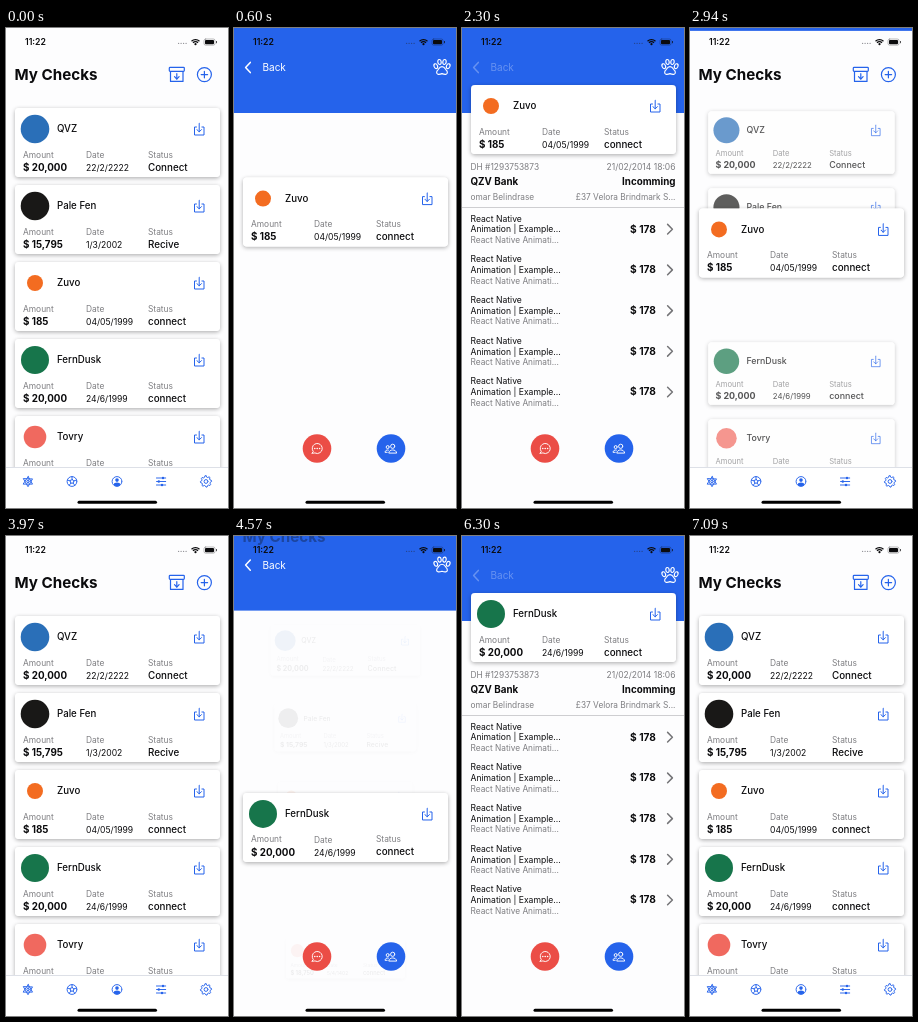
An HTML page with a canvas that plays this animation: 222x480 px, repeating every 7510 ms.

```html
<!DOCTYPE html>
<html lang="en">
<head>
<meta charset="utf-8">
<title>My Checks</title>
<style>
html, body { margin: 0; width: 100%; height: 100%; overflow: hidden; background: #fff; }
canvas { display: block; width: 222px; height: 480px; }
</style>
</head>
<body>
<canvas id="stage"></canvas>
<script>
const W = 222, H = 480, LOOP = 7510;
const BLUE = '#2563eb', INK = '#0b0b0d', GREY = '#7d7d80', PAGE = '#fdfdfe';
const FONT = 'Inter, Roboto, sans-serif';
const HEADER = 85, CARD_TOP = 57;

const canvas = document.getElementById('stage');
const ctx = canvas.getContext('2d');
const ratio = window.devicePixelRatio || 1;
canvas.width = W * ratio;
canvas.height = H * ratio;

const checks = [
  { name: 'QVZ', amount: '$ 20,000', date: '22/2/2222', status: 'Connect', color: '#2a6fb8', r: 14.3 },
  { name: 'Pale Fen', amount: '$ 15,795', date: '1/3/2002', status: 'Recive', color: '#191817', r: 14.3 },
  { name: 'Zuvo', amount: '$ 185', date: '04/05/1999', status: 'connect', color: '#f36c21', r: 8 },
  { name: 'FernDusk', amount: '$ 20,000', date: '24/6/1999', status: 'connect', color: '#17754b', r: 14 },
  { name: 'Tovry', amount: '$ 18,750', date: '5/4/1402', status: 'connect', color: '#f0695f', r: 11.3 }
];
const visits = [
  { card: 2, open: 330, press: 2300, release: 2390, close: 2550 },
  { card: 3, open: 4390, press: 6300, release: 6450, close: 6450 }
];

const slotTop = i => 80 + 77 * i;
const mix = (a, b, p) => a + (b - a) * p;
const ramp = (t, start, length) => Math.min(1, Math.max(0, (t - start) / length));
const ease = x => x < .5 ? 2 * x * x : 1 - 2 * (1 - x) * (1 - x);
const move = (t, start, length) => ease(ramp(t, start, length));

// Everything on screen at time t; 0 = list, 1 = detail.
function stateAt(t) {
  const visit = visits.find(v => t >= v.open && t < v.close + 640);
  if (!visit) return { card: -1, travel: 0, list: 0, header: 0, chrome: 0, buttons: 0, info: 0, rows: [], back: 1 };
  const { card, open, press, release, close } = visit;
  const dim = t >= press ? mix(.3, 1, ramp(t, release + 60, 200)) : 1;
  if (t < close) {
    const s = t - open;
    const list = move(s, 0, 222);
    return {
      card, list, chrome: list, back: dim, opening: true,
      travel: move(s, 0, 555),
      header: move(s, 0, 240),
      buttons: move(s, 0, 160),
      info: move(s, 360, 220),
      rows: [0, 1, 2, 3, 4].map(i => move(s, 390 + 60 * i, 150))
    };
  }
  const s = t - close;
  const travel = 1 - move(s, 0, 640);
  const fade = 1 - move(s, 0, 240);
  return {
    card, travel, list: travel, back: dim,
    header: 1 - move(s, 0, 460),
    chrome: 1 - move(s, 0, 380),
    buttons: fade, info: fade, rows: Array(5).fill(fade)
  };
}

function text(str, x, y, size, color = INK, weight = 400, align = 'left') {
  ctx.font = `${weight} ${size}px ${FONT}`;
  ctx.textAlign = align;
  ctx.fillStyle = color;
  ctx.fillText(str, x, y);
}
function disc(x, y, r, color) {
  ctx.fillStyle = color;
  ctx.beginPath();
  ctx.arc(x, y, r, 0, 7);
  ctx.fill();
}
function ring(x, y, r) {
  ctx.beginPath();
  ctx.arc(x, y, r, 0, 7);
  ctx.stroke();
}
function box(x, y, w, h, r) {
  ctx.beginPath();
  ctx.roundRect(x, y, w, h, r);
}
function line(...p) {
  ctx.beginPath();
  for (let i = 0; i < p.length; i += 2) ctx.lineTo(p[i], p[i + 1]);
  ctx.stroke();
}
function pen(color, width) {
  ctx.strokeStyle = color;
  ctx.lineWidth = width;
  ctx.lineCap = ctx.lineJoin = 'round';
}
function layer(alpha, draw) {
  if (alpha <= 0) return;
  ctx.save();
  ctx.globalAlpha *= alpha;
  draw();
  ctx.restore();
}
function polar(x, y, count, radius) {
  ctx.beginPath();
  for (let i = 0; i < count; i++) {
    const a = i * 2 * Math.PI / count - Math.PI / 2, r = radius(i);
    ctx.lineTo(x + r * Math.cos(a), y + r * Math.sin(a));
  }
  ctx.closePath();
  ctx.stroke();
}

// The shadow is kept outside the card so that a fading card stays white.
function drawPanel(y) {
  ctx.fillStyle = '#fff';
  ctx.save();
  box(9, y, 205, 69, 4);
  ctx.rect(-20, y - 20, W + 40, 109);
  ctx.clip('evenodd');
  ctx.shadowColor = 'rgba(0,0,0,.32)';
  ctx.shadowBlur = 4.5 * ratio;
  ctx.shadowOffsetY = 1.2 * ratio;
  box(9, y, 205, 69, 4);
  ctx.fill();
  ctx.restore();
  box(9, y, 205, 69, 4);
  ctx.fill();
}

function drawCard(c, y) {
  drawPanel(y);
  disc(29, y + 21, c.r, c.color);
  text(c.name, 51, y + 24.4, 9.7, INK, 550);
  text('Amount', 17, y + 49.5, 8.4, GREY);
  text('Date', 80, y + 49.8, 8.4, GREY);
  text('Status', 142, y + 49.5, 8.4, GREY);
  text(c.amount, 17, y + 62.8, 9.8, INK, 700);
  text(c.date, 80, y + 62.6, 8.6);
  text(c.status, 142, y + 62.5, 9.8, INK, 500);
  pen(BLUE, 1);
  line(190.6, y + 19, 188.5, y + 19, 188.5, y + 27, 198, y + 27, 198, y + 19, 195.9, y + 19);
  line(193.2, y + 15.2, 193.2, y + 23.8);
  line(190.9, y + 21.6, 193.2, y + 23.9, 195.5, y + 21.6);
}

function drawList(s) {
  checks.forEach((c, i) => {
    if (i === s.card) return;
    const shrink = s.opening ? .29 + .04 * i : .3;
    const mid = slotTop(i) + 34.5, scale = 1 - shrink * s.list;
    layer(1 - s.list, () => {
      ctx.translate(W / 2, mid);
      ctx.scale(scale, scale);
      ctx.translate(-W / 2, -mid);
      drawCard(c, slotTop(i));
    });
  });
}

function drawTitle(k) {
  layer(Math.min(1, (1 - k) * 5), () => text('My Checks', 8.5, 52.3 - 49.5 * k, 15.2, INK, 700));
  layer(1 - k * 1.1, () => {
    ctx.translate(0, -49.5 * k);
    pen(BLUE, 1.2);
    box(163.3, 39.3, 15, 4, .8);
    ctx.stroke();
    line(164.5, 43.5, 164.5, 53.4, 177, 53.4, 177, 43.5);
    line(170.8, 45.7, 170.8, 50.8);
    line(168.5, 48.7, 170.8, 51, 173.1, 48.7);
    ring(198.4, 46.6, 7);
    line(195.2, 46.6, 201.6, 46.6);
    line(198.4, 43.4, 198.4, 49.8);
  });
}

function drawTabs(k) {
  if (k >= 1) return;
  ctx.save();
  ctx.translate(0, 44 * k);
  ctx.fillStyle = '#fff';
  ctx.fillRect(0, 439, W, 45);
  ctx.fillStyle = '#d5d9e2';
  ctx.fillRect(0, 439, W, .8);
  pen(BLUE, .95);
  const y = 453.5;
  polar(22, y, 3, () => 5.2);
  polar(22, y, 6, i => i % 2 ? 5.2 : 2.6);
  ring(22, y, 1.2);
  ring(66, y, 4.9);
  polar(66, y, 5, () => 2);
  for (let i = 0; i < 5; i++) {
    const a = i * Math.PI * .4 - Math.PI / 2, dx = Math.cos(a), dy = Math.sin(a);
    line(66 + 2 * dx, y + 2 * dy, 66 + 4.8 * dx, y + 4.8 * dy);
  }
  ring(111, y, 4.9);
  disc(111, y - 1.4, 1.8, BLUE);
  ctx.beginPath();
  ctx.ellipse(111, y + 2.8, 3.1, 1.9, 0, 0, 7);
  ctx.fill();
  [[-3.5, 2], [0, -2.2], [3.5, 1]].forEach(([dy, dx]) => {
    line(150.3, y + dy, 159.7, y + dy);
    disc(155 + dx, y + dy, 1.2, BLUE);
  });
  polar(200, y, 32, i => (i + 1) % 4 < 2 ? 5.6 : 4.3);
  ring(200, y, 1.9);
  ctx.restore();
}

function drawHeader(s) {
  if (s.header <= 0) return;
  ctx.save();
  ctx.translate(0, -(HEADER + 1) * (1 - s.header));
  ctx.fillStyle = BLUE;
  ctx.fillRect(0, -2, W, HEADER + 2);
  layer(s.back, () => {
    pen('#fff', 1.5);
    line(16.3, 34.4, 11.6, 39.5, 16.3, 44.6);
    text('Back', 28.5, 43.1, 10, '#fff');
  });
  pen('#fff', 1.15);
  [[201.8, 38.2, -.4], [205.5, 34, -.1], [210.5, 34, .1], [214.2, 38.2, .4]].forEach(([x, y, turn]) => {
    ctx.beginPath();
    ctx.ellipse(x, y, 1.7, 2.5, turn, 0, 7);
    ctx.stroke();
  });
  ctx.beginPath();
  ctx.moveTo(208, 38.6);
  ctx.bezierCurveTo(211.2, 38.6, 211, 41.4, 213, 43);
  ctx.bezierCurveTo(214.4, 46.8, 211, 46.8, 208, 45.6);
  ctx.bezierCurveTo(205, 46.8, 201.6, 46.8, 203, 43);
  ctx.bezierCurveTo(205, 41.4, 204.8, 38.6, 208, 38.6);
  ctx.stroke();
  ctx.restore();
}

function drawInfo(alpha) {
  layer(alpha, () => {
    text('DH #1293753873', 8.5, 142, 8.4, GREY);
    text('21/02/2014 18:06', 213.5, 142, 8.5, GREY, 400, 'right');
    text('QZV Bank', 8.5, 157.3, 9.8, INK, 700);
    text('Incomming', 213.5, 157.3, 9.8, INK, 700, 'right');
    text('omar Belindrase', 8.5, 172, 8.3, GREY);
    text('£37 Velora Brindmark S...', 213.5, 172, 8.3, GREY, 400, 'right');
    ctx.fillStyle = '#c9c9cc';
    ctx.fillRect(0, 179, W, .9);
  });
}

function drawRow(alpha, i) {
  layer(alpha, () => {
    const y = 190.5 + 40.7 * i + 6 * (1 - alpha);
    text('React Native', 8.5, y + 3, 8.6);
    text('Animation | Example...', 8.5, y + 13.9, 8.6);
    text('React Native Animati...', 8.5, y + 24.4, 8.3, GREY);
    text('$ 178', 194, y + 14, 10.2, INK, 700, 'right');
    pen('#747477', 1.5);
    line(205.6, y + 5.9, 210.4, y + 10.7, 205.6, y + 15.5);
  });
}

function drawButton(x, color, k, icon) {
  layer(k, () => {
    ctx.translate(x, 420.5);
    ctx.scale(k, k);
    disc(0, 0, 14.3, color);
    pen('#fff', .95);
    icon();
  });
}
function chatIcon() {
  ctx.beginPath();
  ctx.arc(.2, 0, 5, 2.55, 2.05 + 2 * Math.PI);
  ctx.lineTo(-4.8, 4.8);
  ctx.closePath();
  ctx.stroke();
  [-2.2, .2, 2.6].forEach(x => disc(x, 0, .8, '#fff'));
}
function peopleIcon() {
  ring(1.7, -2.2, 2.1);
  ring(-3.3, -1.4, 1.5);
  ctx.beginPath();
  ctx.moveTo(-2.2, 4.2);
  ctx.bezierCurveTo(-1.8, .4, 5.2, .4, 5.6, 4.2);
  ctx.closePath();
  ctx.moveTo(-2.6, 1.6);
  ctx.bezierCurveTo(-4.5, 1, -5.8, 2.2, -6, 3.8);
  ctx.lineTo(-3.8, 3.8);
  ctx.stroke();
}

function drawStatus() {
  text('11:22', 19, 17.3, 8.7, INK, 600);
  for (let i = 0; i < 4; i++) disc(172.6 + 2.5 * i, 15.4, .65, 'rgba(40,40,50,.5)');
  pen(INK, 1.3);
  ctx.lineCap = 'butt';
  [5.6, 3.5].forEach(r => {
    ctx.beginPath();
    ctx.arc(189.5, 17.2, r, -2.36, -.78);
    ctx.stroke();
  });
  disc(189.5, 16.2, 1.1, INK);
  pen('rgba(10,10,12,.45)', .6);
  box(198, 11, 11, 6.2, 1.7);
  ctx.stroke();
  ctx.fillStyle = INK;
  box(199, 12, 9, 4.2, .9);
  ctx.fill();
  ctx.fillRect(210, 13, .7, 2.2);
}

function draw(t) {
  const s = stateAt(t);
  ctx.setTransform(ratio, 0, 0, ratio, 0, 0);
  ctx.fillStyle = PAGE;
  ctx.fillRect(0, 0, W, H);
  drawList(s);
  drawHeader(s);
  drawTitle(s.chrome);
  drawInfo(s.info);
  s.rows.forEach(drawRow);
  drawButton(83, '#eb4d46', s.buttons, chatIcon);
  drawButton(157, BLUE, s.buttons, peopleIcon);
  if (s.card >= 0) drawCard(checks[s.card], mix(slotTop(s.card), CARD_TOP, s.travel));
  drawTabs(s.chrome);
  drawStatus();
  ctx.fillStyle = '#000';
  box(71.5, 472.8, 79.5, 3, 1.5);
  ctx.fill();
}

const begin = performance.now();
function frame() {
  draw((performance.now() - begin) % LOOP);
  requestAnimationFrame(frame);
}
frame();
</script>
</body>
</html>
```
